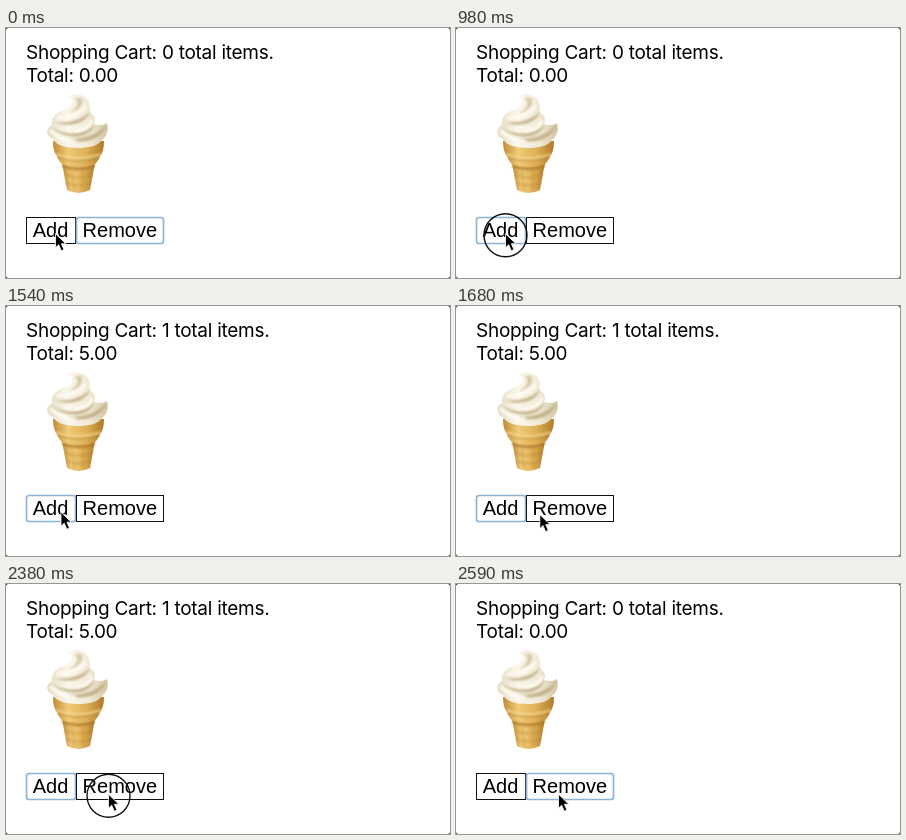
Animation of 444 by 250 pixels, one loop 3.5 s. Source, as an HTML page:

```html
<!DOCTYPE html>
<html lang="en">
<head>
<meta charset="utf-8">
<title>Shopping cart</title>
<style>
  html, body { margin: 0; width: 100%; height: 100%; overflow: hidden; background: #222; }
  svg { display: block; width: 444px; height: 250px; background: #fff; border-radius: 2.5px; }
  .summary { font: 19px Inter, sans-serif; letter-spacing: -.27px; }
  .label { font: 20px "Liberation Sans", Arial, sans-serif; }
  .button { fill: #fff; stroke: #111; stroke-width: 1; }
  .button.focus { stroke: #8db3d6; stroke-width: 1.7; rx: 2.5px; }
</style>
</head>
<body>
<svg viewBox="0 0 444 250">
  <defs>
    <linearGradient id="cream">
      <stop offset="0" stop-color="#e6dcc4"/>
      <stop offset=".35" stop-color="#fbf7ea"/>
      <stop offset=".7" stop-color="#f1e9d6"/>
      <stop offset="1" stop-color="#d3c5a3"/>
    </linearGradient>
    <linearGradient id="wafer">
      <stop offset="0" stop-color="#c18b35"/>
      <stop offset=".3" stop-color="#efca78"/>
      <stop offset=".65" stop-color="#dfb055"/>
      <stop offset="1" stop-color="#b07a2a"/>
    </linearGradient>
    <filter id="soft"><feGaussianBlur stdDeviation=".8"/></filter>
  </defs>

  <g class="summary">
    <text id="items" x="20" y="31"></text>
    <text id="total" x="20" y="54"></text>
  </g>

  <g id="cone">
    <path fill="url(#wafer)" d="M56 135 L61 162 Q72 168 84 162 L89 135Z"/>
    <path fill="url(#wafer)" d="M47 113 Q47 124 51 128 Q53 134 57 137 Q72 143 88 137 Q92 134 94 128 Q98 124 98 113Z"/>
    <g fill="none" stroke="#a87428" filter="url(#soft)">
      <path d="M56 138 Q72 144 89 138" stroke-width="1.8"/>
      <path d="M51 129 Q72 137 94 129" stroke-width="1" opacity=".7"/>
      <path d="M59 147 Q72 152 87 147 M60 155 Q72 160 85 155 M66 142 L68 163 M77 142 V163" opacity=".55"/>
      <path d="M50 126 Q72 134 95 126" stroke="#f7dc97" stroke-width="1.5"/>
    </g>
  </g>
  <g id="swirl">
    <path fill="url(#cream)" d="M61 70 C66 64 79 65 83 74 C85 80 82 84 87 87 C90 90 89 93 88 96
      C94 98 98 97 101 95 C103 102 101 108 96 112 C92 118 83 120 72 120 C59 120 50 117 47 111
      C40 109 39 100 46 97 C45 90 49 85 57 82 C65 79 68 75 66 71 Q64 69 61 70Z"/>
    <g fill="#baa87d" opacity=".8" filter="url(#soft)">
      <path d="M49 94 C61 96 77 92 84 83 C82 94 65 101 49 94Z"/>
      <path d="M45 99 C59 109 81 107 88 96 C87 108 64 116 45 99Z"/>
      <path d="M60 111 C76 112 93 106 100 97 C98 110 78 118 60 111Z"/>
      <path d="M68 70 C75 74 71 82 61 86 C71 84 79 77 75 70Z" opacity=".7"/>
    </g>
    <g fill="none" stroke="#fffdf4" stroke-linecap="round" stroke-width="2.5" filter="url(#soft)">
      <path d="M52 90 C62 90 73 86 79 79 M45 103 C52 110 61 113 69 113 M70 103 C78 102 84 98 86 93"/>
    </g>
  </g>

  <g class="label">
    <rect id="add" class="button" x="20.5" y="189.5" width="49" height="26"/>
    <rect id="remove" class="button" x="70.5" y="189.5" width="87" height="26"/>
    <text x="26.7" y="209">Add</text>
    <text x="76.6" y="209">Remove</text>
  </g>

  <g id="pointer">
    <circle id="press" cy=".5" r="21.5" fill="none" stroke="#111" stroke-width="1.4"/>
    <path fill="#000" stroke="#fff" stroke-width=".8" d="M0 -1 V13 L3.2 10 L5.8 16 L8.4 14.9 L5.9 9 H10.3Z"/>
  </g>
</svg>
<script>
  const LOOP = 3500, STEP = 70;
  const byId = id => document.getElementById(id);
  const within = (time, start, end) => time >= start && time < end;

  function draw(now) {
    const time = Math.floor(now % LOOP / STEP) * STEP;
    const count = within(time, 1050, 2520) ? 1 : 0;
    const addFocused = within(time, 980, 2450);
    const pressed = within(time, 980, 1050) || within(time, 2380, 2520);

    const p = Math.min(1, Math.max(0, (time - 1470) / 350));
    const eased = p * p * (3 - 2 * p);

    byId('items').textContent = `Shopping Cart: ${count} total items.`;
    byId('total').textContent = `Total: ${(count * 5).toFixed(2)}`;
    byId('add').classList.toggle('focus', addFocused);
    byId('remove').classList.toggle('focus', !addFocused);
    byId('press').setAttribute('visibility', pressed ? 'visible' : 'hidden');
    byId('pointer').setAttribute('transform', `translate(${49.5 + 53 * eased} ${206.7 + 4.5 * eased})`);
  }

  function frame() {
    draw(performance.now());
    requestAnimationFrame(frame);
  }
  frame();
</script>
</body>
</html>
```
